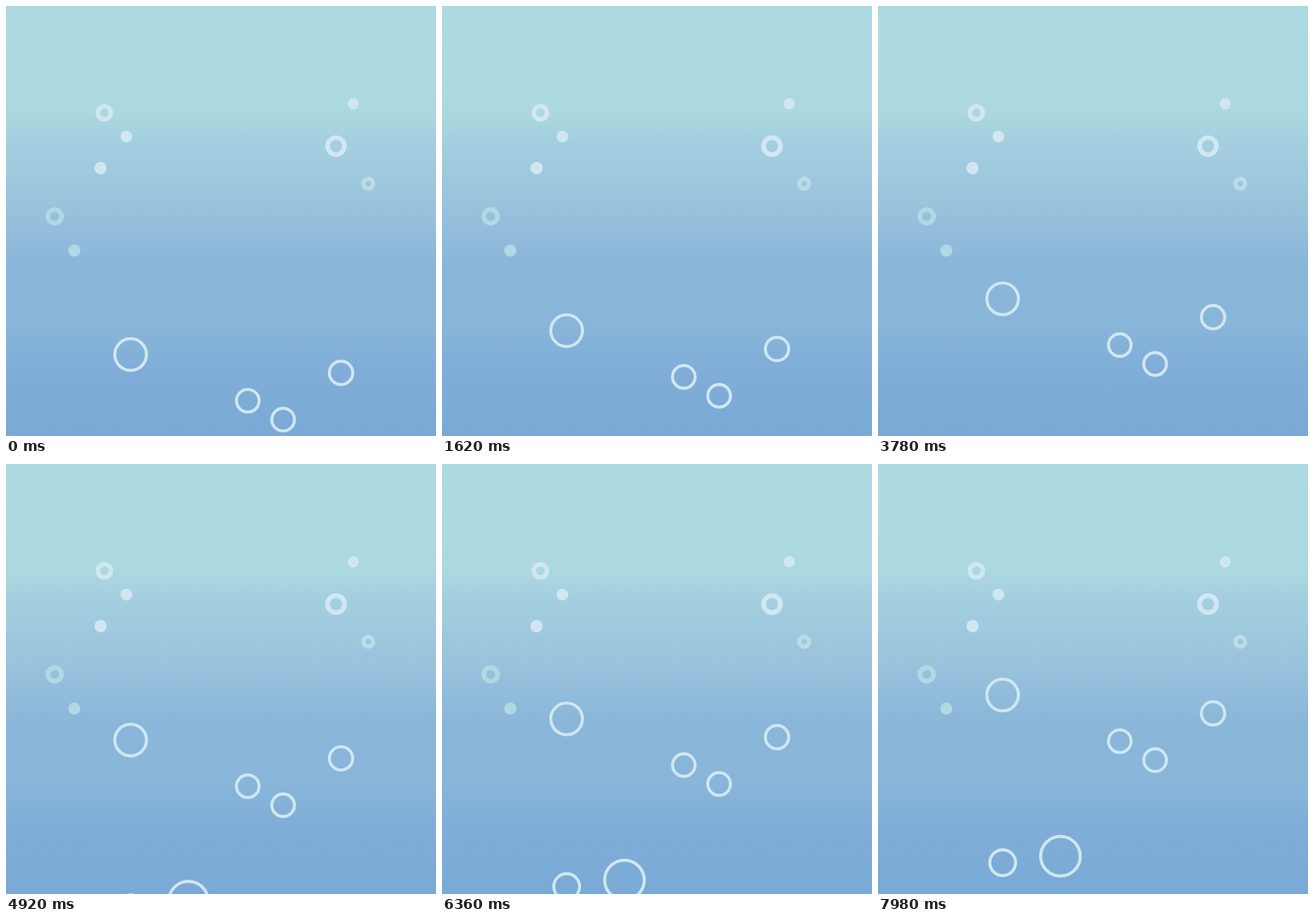
An HTML page for the animation above (8 s loop, 600x600 px).

```html
<!DOCTYPE html>
<html lang="en">
<head>
<meta charset="utf-8">
<title>Rising bubbles</title>
<style>
  html, body { margin: 0; width: 100%; height: 100%; overflow: hidden; }
  svg {
    display: block; width: 100%; height: 100%;
    background: linear-gradient(#addae1 0%, #acd8e0 25%, #a4cfdf 31%, #9ac3dc 46%,
      #92bcdb 53%, #8ab6d9 60%, #89b5d9 74%, #80aed8 84%, #7aa9d6 100%);
  }
</style>
</head>
<body>
<svg viewBox="0 0 600 600">
  <g id="still"></g>
  <g id="rising"></g>
</svg>
<script>
const LOOP = 8000, STEP = 60;
const SPEED = 164 / 7980; // px per ms
const PALE = '#d0e7f1', AQUA = '#b0d9e3';

const still = document.getElementById('still');
const rising = document.getElementById('rising');

// A disc when inner is 0, otherwise a ring between the two radii.
function bubble(parent, cx, cy, outer, inner, color) {
  const circle = document.createElementNS('http://www.w3.org/2000/svg', 'circle');
  const attributes = {
    cx, cy,
    r: inner ? (outer + inner) / 2 : outer,
    fill: inner ? 'none' : color,
    stroke: inner ? color : 'none',
    'stroke-width': outer - inner
  };
  for (const name in attributes) circle.setAttribute(name, attributes[name]);
  parent.append(circle);
}

bubble(still, 137.3, 149, 12.3, 6, PALE);
bubble(still, 168, 182.3, 8.2, 0, PALE);
bubble(still, 132, 226.2, 8.6, 0, PALE);
bubble(still, 68, 293.5, 12.8, 6.3, AQUA);
bubble(still, 95.3, 341.2, 8.5, 0, AQUA);
bubble(still, 484.5, 136.3, 7.9, 0, PALE);
bubble(still, 460.5, 195.5, 15.1, 8.5, PALE);
bubble(still, 505.4, 248, 9.9, 3.8, '#b9dce7');

const risers = [
  [173.9, 486.3, 24.2, 20],
  [337.4, 550.8, 17.9, 13.7],
  [386.7, 577.2, 17.9, 13.7],
  [467.5, 511.9, 18.4, 14.2],
  [254.6, 711.2, 29.8, 25.5],
  [174, 720.3, 20.1, 15.9]
];
for (const riser of risers) bubble(rising, ...riser, PALE);

function draw() {
  const time = performance.now() % LOOP;
  const stepped = Math.floor(time / STEP) * STEP;
  rising.setAttribute('transform', `translate(0 ${-stepped * SPEED})`);
  requestAnimationFrame(draw);
}
draw();
</script>
</body>
</html>
```
